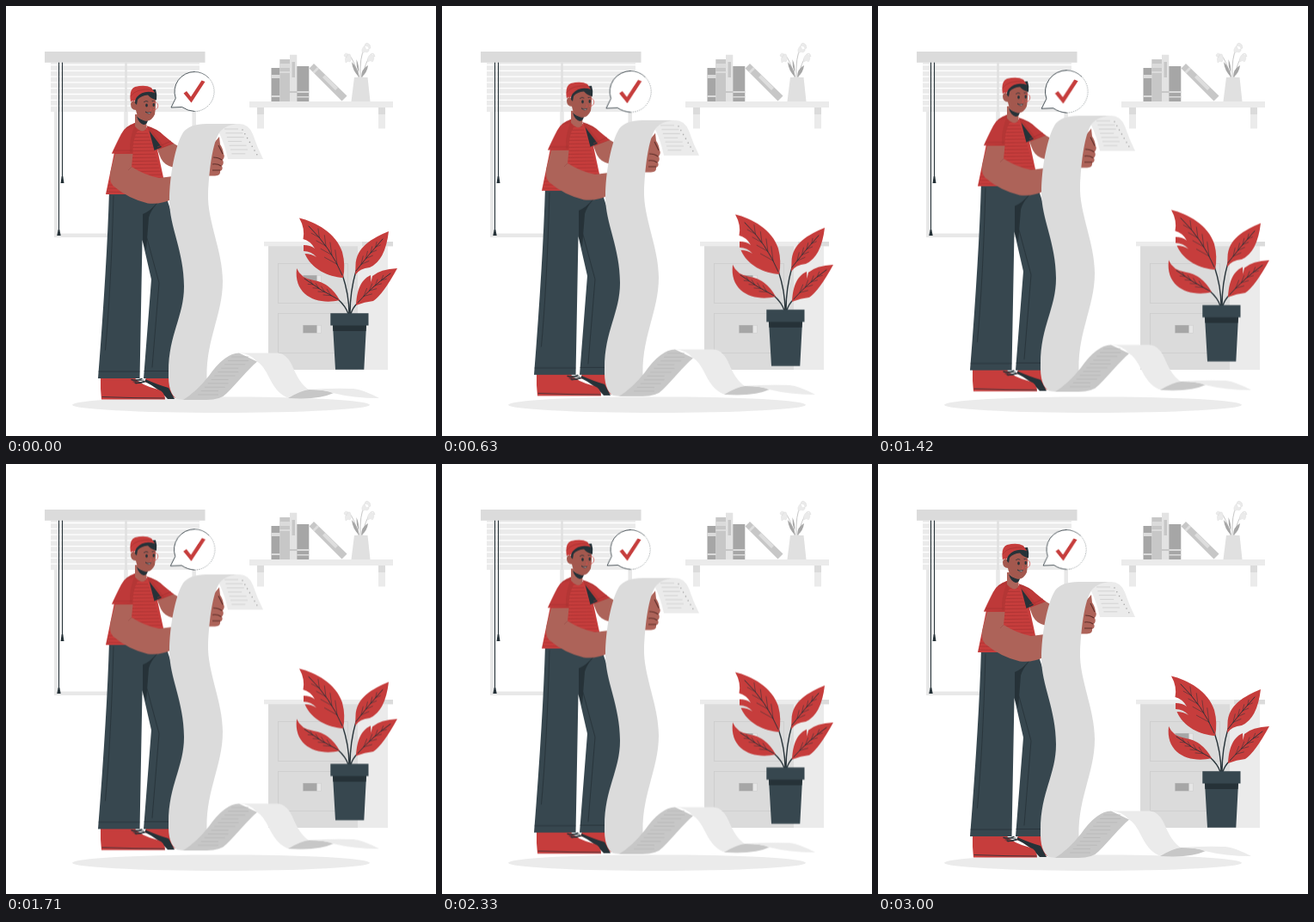
An HTML page that plays this animation: 500 px wide and 500 px high, repeating every 3040 ms.

```html
<!DOCTYPE html>
<html lang="en">
<head>
<meta charset="utf-8">
<title>Long receipt</title>
<style>
html, body { margin: 0; width: 100%; height: 100%; overflow: hidden; background: #fff; }
svg { display: block; width: 100vw; height: 100vh; }
#bubble { transform-origin: 217px 99.5px; }
.red { fill: #c63d3c; }
.deep { fill: #b43635; }
.skin { fill: #ad6359; }
.navy { fill: #37474f; }
.ink { fill: #263238; }
.g1 { fill: #ebebeb; }
.g2 { fill: #dbdbdb; }
.g3 { fill: #c7c7c7; }
.g4 { fill: #a6a6a6; }
.line { fill: none; stroke: #263238; stroke-width: .8; stroke-linecap: round; stroke-linejoin: round; }
.stripe { fill: none; stroke: #a03030; stroke-width: .6; }
.print { fill: none; stroke: #c9c9c9; stroke-width: .7; }
</style>
</head>
<body>
<svg viewBox="0 0 500 500" xmlns="http://www.w3.org/2000/svg">
<defs>
  <clipPath id="teeClip"><path d="M149 138L164 145L172 167L182 200L178 201Q162 196 146 187L147 172Z"/></clipPath>
  <clipPath id="hemClip"><path d="M120 203Q125 212 145 219H116Z"/></clipPath>
</defs>

<g id="window">
  <path fill="none" stroke="#e8e8e8" stroke-width="4.5" d="M58.3 66V266.8H218.7V66M139.5 66V266"/>
  <rect class="g1" x="52" y="66" width="173" height="57"/>
  <g id="slats"></g>
  <path stroke="#e0e0e0" stroke-width="2.5" d="M139.5 66V123"/>
  <rect class="g2" x="45" y="53" width="186.500" height="12.800"/>
  <path class="line" style="stroke-width:1.1" d="M61.500 66V262M65.500 66V200"/>
  <path class="ink" d="M60.700 260H62.300L63.700 267H59.300ZM64.700 198H66.300L67.500 206H63.500Z"/>
</g>

<g id="shelf">
  <path class="g1" d="M283 111H450V118H283ZM292 118H300V142.500H292ZM433 118H441V142.500H433Z"/>
  <path class="g2" d="M292 118H300V126H292ZM433 118H441V126H433Z"/>
  <rect class="g4" x="308.500" y="72" width="10" height="39"/>
  <rect class="g3" x="318.300" y="62" width="12" height="49"/>
  <rect x="330" y="56.700" width="8.300" height="54.300" fill="#e3e3e3"/>
  <rect class="g4" x="338.300" y="70" width="14" height="41"/>
  <path class="g2" d="M308.500 80H318.500V84H308.500ZM318.300 67H330.300V72H318.300ZM318.300 76H330.300V78H318.300ZM308.500 104H318.500V106H308.500ZM338.300 99H352.300V101H338.300ZM338.300 105H352.300V106.500H338.300Z"/>
  <path class="g3" d="M332.500 65H336V83H332.500ZM330 99H338.300V101H330ZM352.500 72.500L358 67L396.500 104.500L390.500 110.500Z"/>
  <path class="g1" d="M356.500 76.500L362 71L364 73L358.500 78.500ZM368 83L371 80L386 95L383 98Z" opacity=".6"/>
  <path fill="none" stroke="#c7c7c7" stroke-width="1" d="M412 83Q411 60 417 48M410 83Q405 62 398 56M414 83Q418 65 424 57"/>
  <path class="g4" d="M411 83Q403 76 402 65Q409 72 411 83ZM413 83Q413 73 421 69Q420 78 413 83ZM410 78Q407 70 407.500 62Q411 70 410 78Z"/>
  <path class="g1" stroke="#dbdbdb" stroke-width=".4" d="M417 46Q412 51 415 55Q418 52 419 54Q424 53 421 47ZM417 47Q417 43 420 43Q424 44 424 49L419 51ZM398 56Q393 60 395 66Q398 63 400 65Q403 61 400 56ZM398 56Q394 53 393 58L396 60ZM424 56Q419 60 421 65Q424 62 426 65Q429 62 427 56ZM424 56Q428 53 429 59Z"/>
  <path fill="#e0e0e0" d="M405 83H420.500L423.500 111H401.500Z"/>
</g>

<g id="cabinet">
  <rect class="g1" x="408" y="279" width="36" height="144"/>
  <rect class="g2" x="305" y="279" width="104" height="144"/>
  <rect class="g1" x="300" y="274" width="150" height="5.300"/>
  <rect class="g2" x="414" y="274" width="36" height="5.300"/>
  <g id="drawers"></g>
</g>

<ellipse class="g1" cx="250" cy="463.700" rx="173" ry="9.300"/>

<g id="float">
  <g id="plant">
    <path class="line" style="stroke-width:1.400" d="M399 358Q399 336 391 312M400 358Q400 332 407 308M398 358Q395 349 386 341M401 358Q403 351 409 345"/>
    <path class="red" d="M341 246.500C360 251 384 264 391 286Q395 301 392 316C375 315 355 306 347.500 288Q355 288 361 292Q355 285 346 285V278Q354 278 359 282Q354 273 345.500 271Q348 259 341 246.500Z"/>
    <path class="red" d="M445 262C426 270 407 280 406.500 302L406 313Q411 305 423 304Q441 296 445 262Z"/>
    <path class="red" d="M455 305Q435 306 426 314L424.500 321L424 313C411 319 408 333 407 348Q417 344 427 343Q438 336 455 305Z"/>
    <path class="red" d="M338 305Q343 317 358 319Q377 322 388 342C364 348 334 338 338 305Z"/>
    <g id="veins" class="line" style="stroke-width:.9"></g>
    <path class="navy" d="M377.300 357.300H421.500V371.500H377.300ZM380 371H419L416.300 422.800H383Z"/>
    <path class="ink" d="M380 371.500H419L418.500 378H380.400Z"/>
  </g>

  <g id="man">
    <path class="skin" d="M174 162L192 158L207 167V187.500H194Q184 185 180 177Z"/>
    <!-- shoes -->
    <path class="red" d="M163 432H190L197 456L184 448Q172 440 161 437Z"/>
    <path class="ink" d="M162 434Q178 441 189 444L196 457H188Q178 445 162 437Z"/>
    <path class="red" d="M110 432H149Q157 441 177 446Q185 449 185 457.500H111Q109.500 445 110 432Z"/>
    <path class="line" d="M112 454.500Q150 456 184 456M148 437L160 435M151 439L162 437"/>
    <path class="line" style="stroke-width:1.400" d="M146 434.500Q152 436 158 433.500M150 438Q155 439 161 436.500"/>
    <!-- trousers -->
    <path class="navy" d="M120 215H178L187 224Q196 250 205 290L210 340L190 433H160L169 318L158.500 272L155.500 433H107Q117.500 300 120 215Z"/>
    <path class="ink" d="M159 242Q168 238 175 231Q168 238 166 246L163 284L159 273Z"/>
    <path class="line" d="M164 270L178 322L170 420M125 221Q122 330 115.500 400M108 425H155M161 424.500H190M166 239L176 229"/>
    <!-- tee and open shirt -->
    <path class="red" d="M149 136L166 142L176 167L184 204L160 219H116L126 170Z"/>
    <g id="stripes"></g>
    <path class="deep" d="M150 136Q139 139 134 149L123 171.500H147.500Q147 155 153 145ZM163 139Q177 143 184 151L195 160L177 167Q173 153 166 145Z"/>
    <path class="red" d="M138 143Q132 150 123 171.500L144 170Q143 157 149 140ZM168 143Q180 147 184 151L195 160L184 163Z" opacity=".55"/>
    <path class="ink" d="M166.500 145L181 164L172.500 168Z"/>
    <path class="stripe" d="M125 168H147M176 164L192 157"/>
    <path class="skin" d="M127 172H147.500L146 187Q162 197 178 200L194 198V224Q181 231 165 229.500Q142 224 124.500 209Q118 202 123 187Z"/>
    <path fill="none" stroke="#9a5149" stroke-width=".7" d="M146 187L142 191"/>
    <!-- head -->
    <path class="skin" d="M150 126H164L163 143Q158 149 150 140Z"/>
    <path class="ink" d="M152 128Q157 134 165 133Q164 138 160 138Q154 136 152 128Z"/>
    <path fill="#a3584e" d="M151 104L173 101Q175 114 173 126Q169 135 161 133.500Q152 130 151 121Q145 121 145 114Q146 109 150 111Z"/>
    <path class="ink" d="M150 113Q149 103 160 98L174 97Q176 103 175 109.500Q169 108 165 103.500Q157 104 153 109L152 115Z"/>
    <path class="red" d="M145 112Q142.500 97 150 94Q162 91 169 95L173 101Q160 97 152 106L149 111Q146 109 145 112Z"/>
    <path class="stripe" d="M145 105Q150 96 170 97"/>
    <ellipse class="ink" cx="163.500" cy="115.500" rx="1.300" ry="1.900"/>
    <ellipse class="ink" cx="171.700" cy="115" rx="1.200" ry="1.900"/>
    <path class="line" d="M160.500 111.500Q163 109.500 165 111M170 110.500L173 111"/>
    <path fill="none" stroke="#d4524f" stroke-width=".7" d="M168 118Q170 122 167 122M171 111.500A4.500 4.700 0 1 1 171 120.500"/>
    <path fill="#fff" stroke="#263238" stroke-width=".7" d="M162 123Q165 125 168.500 123.500Q167 127 162 123Z"/>
    <!-- far hand -->
    <path class="skin" d="M248 152L249 161Q252 165 253 172Q255 175 252 179Q254 183 251 186Q253 190 249 192Q250 197 243 197.500H232L237 165Z"/>
    <path fill="none" stroke="#5f302b" stroke-width="1.100" d="M241 176Q247 176 251 179M240 184Q246 183 250 186M240 191H249M247 162L252 172"/>
  </g>

  <g id="receipt">
    <path class="g1" d="M248 148Q252 138 271 137Q282 137 287 149Q292 164 299 178H258Q254 160 248 148Z"/>
    <g id="topPrint"></g>
    <path class="g2" d="M271 137H237Q214 136 206 147C197 161 190 198 190 226C190 257 207 285 207 326C207 361 189 382 189 425Q188 451 199 457L207 458H231Q239 452 234 440C230 392 252 361 252 320C252 285 234 250 235 219C236 196 239 164 247 149Q253 138 271 137Z"/>
    <path class="g3" d="M206 458Q222 448 236 430Q254 404 271 403.500L292 413.500C280 424 269 438 257 450Q250 458 233 458Z"/>
    <g id="lowPrint"></g>
    <path class="g1" d="M271 403.500H316Q327 404 334 421Q343 442 354 447L329 456Q316 452 307 434Q299 417 292 413.500Q284 404 271 403.500Z"/>
    <path class="g3" d="M328 456Q343 447 353 446Q372 446 381 450Q368 456 343 456.500Z"/>
    <path class="g1" d="M352 446Q380 444 404 445Q415 446 434 456Q404 456 380 450Q370 446 352 446Z"/>
  </g>
</g>

<g id="bubble">
  <path fill="#fff" d="M192 118L197.300 107.200A23 23 0 1 1 204.700 117.500Z"/>
  <path class="line" d="M219 76.500A23 23 0 0 0 197.300 107.200L192 118L204.700 117.500Q211 122 219 122.500"/>
  <path class="line" style="stroke-width:.6" d="M219 76.500A23 23 0 0 1 235.300 83.200"/>
  <path class="line" style="stroke-width:.5;stroke-dasharray:.3 2" d="M235.300 83.200A23 23 0 0 1 219 122.500"/>
  <path class="red" d="M206.500 101.500L210 99L215 105.500L227.500 86.500L231.500 88L215.500 112.500Z"/>
</g>
</svg>

<script>
const LOOP = 3040, CYCLE = 3000;
const $ = id => document.getElementById(id);

function add(parent, tag, attrs) {
  const el = document.createElementNS('http://www.w3.org/2000/svg', tag);
  for (const key in attrs) el.setAttribute(key, attrs[key]);
  $(parent).append(el);
  return el;
}
const stroke = (parent, d, extra) => add(parent, 'path', { d, ...extra });

// Blind slats
for (let i = 0; i < 8; i++) {
  stroke('slats', `M52 ${68.5 + i * 6.8}H225`, { stroke: '#fff', 'stroke-width': 1.3 });
}

// Drawers with handles
for (const y of [299.5, 357.5]) {
  add('drawers', 'rect', { x: 316.5, y, width: 81, height: 46, fill: 'none', stroke: '#cdcdcd', 'stroke-width': .8 });
  add('drawers', 'rect', { x: 345.5, y: y + 13.7, width: 21, height: 9, fill: '#e6e6e6', stroke: '#cdcdcd', 'stroke-width': .6 });
  add('drawers', 'rect', { x: 345.5, y: y + 13.7, width: 16, height: 9, class: 'g4' });
}

// Tee stripes
for (let y = 144; y < 220; y += 4) {
  const clip = y < 202 ? 'teeClip' : 'hemClip';
  stroke('stripes', `M112 ${y}Q150 ${y + 1} 186 ${y}`, { class: 'stripe', 'clip-path': `url(#${clip})` });
}

// Leaf midrib with paired side veins: base, tip, bend, side length
function leaf(x0, y0, x1, y1, bend, side) {
  const dx = x1 - x0, dy = y1 - y0, len = Math.hypot(dx, dy);
  const ux = dx / len, uy = dy / len;
  const cx = (x0 + x1) / 2 - uy * bend, cy = (y0 + y1) / 2 + ux * bend;
  stroke('veins', `M${x0} ${y0}Q${cx} ${cy} ${x1} ${y1}`);
  let d = '';
  for (let t = .2; t < .8; t += .18) {
    const a = (1 - t) ** 2, b = 2 * t * (1 - t), c = t * t;
    const x = a * x0 + b * cx + c * x1, y = a * y0 + b * cy + c * y1;
    const s = side * (1 - t * .6);
    for (const k of [-.5, .5]) d += `M${x} ${y}l${(ux - uy * k) * s} ${(uy + ux * k) * s}`;
  }
  stroke('veins', d, { 'stroke-width': .5 });
}
leaf(391, 313, 352, 256, 7, 17);
leaf(407, 308, 438, 271, -1, 10);
leaf(409, 345, 447, 311, -3, 10);
leaf(386, 341, 347, 317, -2, 9);

// Printed rows
for (let i = 0; i < 7; i++) {
  const y = 143 + i * 4.8, x = 254 + i * 1.4;
  stroke('topPrint', `M${x} ${y}h${i % 3 ? 20 : 16}`, { class: 'print' });
  add('topPrint', 'circle', { cx: 275 + i * 2.8, cy: y + 1, r: .8, class: 'g4' });
}
for (let i = 0; i < 11; i++) {
  const y = 408 + i * 4.4, x = 262 - i * 3.9;
  stroke('lowPrint', `M${x} ${y}h${i % 3 ? 24 : 20}`, { class: 'print', style: 'stroke:#b5b5b5' });
}

function play(id, steps) {
  const frames = steps.map(([ms, transform]) => ({ offset: ms / LOOP, transform }));
  const motion = $(id).animate(frames, { duration: LOOP, iterations: Infinity, easing: 'linear' });
  motion.startTime = 0;
}
const low = 'translateY(0px)', high = 'translateY(-10px)';
const rest = 'scale(1)', beat = 'scale(1.1)';
play('float', [[0, low], [CYCLE / 2, high], [CYCLE, low], [LOOP, low]]);
play('bubble', [[0, rest], [300, beat], [900, rest], [1200, rest], [1500, beat], [1800, rest], [LOOP, rest]]);
</script>
</body>
</html>
```
